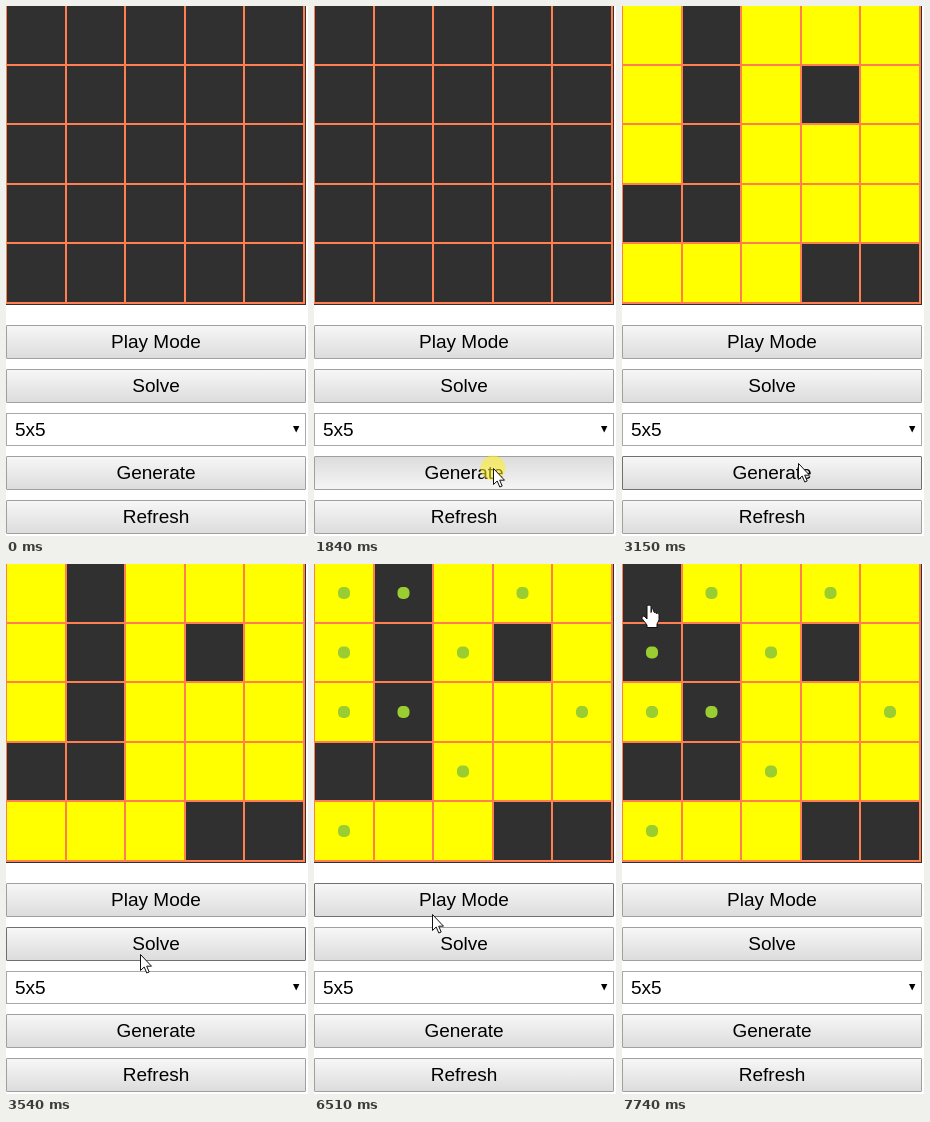
Animation of 302 by 530 pixels, one loop 7990 ms. Source, as an HTML page:

```html
<!DOCTYPE html>
<html lang="en">
<head>
<meta charset="utf-8">
<title>Lights puzzle</title>
<style>
html, body { margin: 0; width: 100%; height: 100%; overflow: hidden; background: #fff; }
svg { display: block; }
text { font: 19px "Liberation Sans", Arial, sans-serif; fill: #000; }
</style>
</head>
<body>
<svg id="stage" width="302" height="530" viewBox="0 0 302 530">
  <defs>
    <linearGradient id="up" x2="0" y2="1"><stop stop-color="#f7f7f7"/><stop offset="1" stop-color="#dcdcdc"/></linearGradient>
    <linearGradient id="down" x2="0" y2="1"><stop stop-color="#dcdcdc"/><stop offset="1" stop-color="#f5f5f5"/></linearGradient>
  </defs>
</svg>
<script>
const LOOP = 7990;
const CELL = 59.5;
const stage = document.getElementById('stage');

function add(tag, attrs, text) {
  const el = document.createElementNS('http://www.w3.org/2000/svg', tag);
  for (const key in attrs) el.setAttribute(key, attrs[key]);
  if (text) el.textContent = text;
  return stage.appendChild(el);
}
const show = (el, on) => el.setAttribute('visibility', on ? 'visible' : 'hidden');

// Board
const lit = ['10111', '10101', '10111', '00111', '11100'];
const dotted = ['11010', '10100', '11001', '00100', '10000'];
const cells = [], dots = [];
add('rect', { width: 300, height: 299, fill: '#303030' });
for (let i = 0; i < 25; i++) {
  const col = i % 5, row = Math.floor(i / 5);
  cells.push(add('rect', { x: col * CELL, y: row * CELL - 1, width: CELL, height: CELL, fill: '#ff0' }));
}
let lines = '';
for (let i = 0; i <= 5; i++) {
  const p = Math.round(i * CELL);
  lines += `M${p} 0V298M0 ${p - 1}H299`;
}
add('path', { d: lines, stroke: '#ff7f50', 'stroke-width': 2 });
for (let i = 0; i < 25; i++) {
  const col = i % 5, row = Math.floor(i / 5);
  if (dotted[row][col] === '1') {
    const x = 24 + col * CELL, y = 23 + row * CELL;
    dots.push(add('rect', { x, y, width: 12, height: 12, rx: 5, fill: '#9acd32' }));
  }
}

// Controls
const buttons = [['Play Mode', 319], ['Solve', 363], ['Generate', 450], ['Refresh', 494]].map(([label, y]) => {
  const box = add('rect', { x: 0.5, y: y + 0.5, width: 299, height: 33, rx: 0.5 });
  add('text', { x: 150, y: y + 23, 'text-anchor': 'middle' }, label);
  return { box, y };
});
add('rect', { x: 0.5, y: 407.5, width: 299, height: 32, fill: '#fff', stroke: '#a9a9a9' });
add('text', { x: 9, y: 430 }, '5x5');
add('path', { d: 'M287 420h6.4l-3.2 6.5z' });

// Pointer
const halo = add('circle', { r: 12.5, fill: '#ffee1e', opacity: 0.55 });
const arrow = add('path', {
  d: 'M.5 .5V16.5L4.2 13L6.8 19L9.2 18L6.7 12.2H11.5Z',
  fill: '#fff', stroke: '#111', 'stroke-width': 1
});
const hand = add('path', {
  d: 'M-2 1.5Q-2 0 0 0T2 1.5V7.5Q4-.1 5 7.2Q6 6.8 7 8.4Q10 7.3 10 10.5V15L8 19V22.5H-2V20L-7 13.5Q-7.5 10.5-5 11L-2 14Z',
  fill: '#fff', stroke: '#111', 'stroke-width': 1
});

const smooth = u => u * u * (3 - 2 * u);
const easeOut = u => Math.sin(u * Math.PI / 2);
const moves = [
  { start: 420, end: 960, steps: 8, from: [198, 522], to: [179, 462], ease: easeOut },
  { start: 3150, end: 3540, steps: 6, from: [176, 457], to: [134, 390], ease: smooth },
  { start: 6510, end: 7210, steps: 10, from: [118, 350], to: [27, 41], ease: easeOut }
];
const presses = [[1840, 1910], [5730, 5810], [7670, 7740]];

function pointer(t) {
  const m = moves.filter(move => t >= move.start).pop();
  if (!m) return null;
  const n = m.steps - 1;
  const step = Math.min(n, Math.floor((t - m.start) / (m.end - m.start) * n + 1e-6));
  const k = m.ease(step / n);
  return m.from.map((a, i) => Math.round(a + (m.to[i] - a) * k));
}

function draw(t) {
  const at = pointer(t);
  const pressed = presses.some(([a, b]) => t >= a && t < b);
  const toggled = t >= 7740;

  cells.forEach((cell, i) => {
    const flip = toggled && (i === 0 || i === 1 || i === 5);
    show(cell, t >= 1910 && (lit[Math.floor(i / 5)][i % 5] === '1') !== flip);
  });
  dots.forEach((dot, i) => show(dot, t >= 5810 && !(toggled && i === 0)));

  for (const { box, y } of buttons) {
    const hover = at && at[1] >= y && at[1] < y + 34;
    box.setAttribute('fill', hover && pressed ? 'url(#down)' : 'url(#up)');
    box.setAttribute('stroke', hover && !pressed ? '#707070' : '#a0a0a0');
  }

  const onBoard = at && at[1] < 299;
  show(halo, at && pressed);
  show(arrow, at && !onBoard);
  show(hand, onBoard);
  if (at) for (const el of [halo, arrow, hand]) el.setAttribute('transform', `translate(${at})`);
}

const begin = performance.now();
function tick() {
  draw((performance.now() - begin) % LOOP);
  requestAnimationFrame(tick);
}
tick();
</script>
</body>
</html>
```
